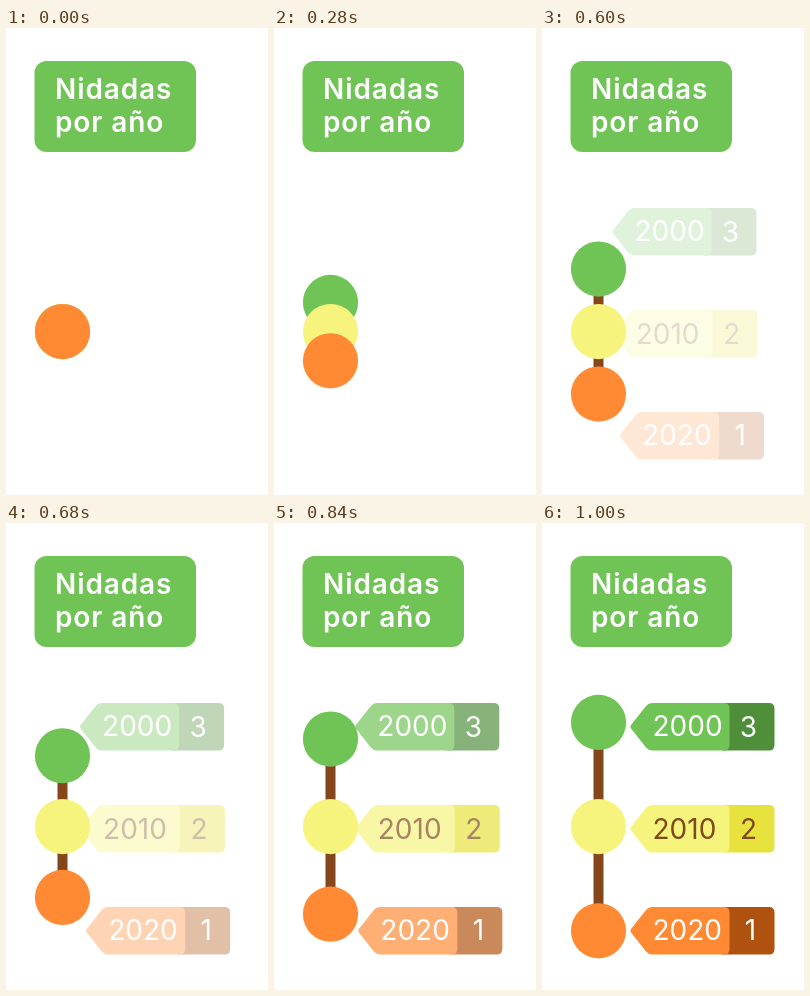
Write an HTML page that moves like this. It is 262 px wide and 467 px high and loops after 3 s.

```html
<!DOCTYPE html>
<html lang="es">
<head>
<meta charset="utf-8">
<title>Nidadas por año</title>
<style>
  html, body { margin: 0; width: 100%; height: 100%; overflow: hidden; background: #fff; }
  svg { display: block; width: 100vw; height: 100vh; }
  text { font: 28px Inter, "Open Sans", sans-serif; }
  .title { font-weight: 600; letter-spacing: 0.9px; fill: #fff; }
  .count { text-anchor: middle; }
</style>
</head>
<body>
<svg viewBox="0 0 262 467">
  <rect x="28.5" y="33" width="161.5" height="91" rx="12" fill="#70c355"/>
  <text class="title" x="49" y="70.5">Nidadas</text>
  <text class="title" x="49" y="103.5">por año</text>
  <rect id="rod" x="51.5" width="10" fill="#84461a"/>
  <g id="labels"></g>
  <g id="dots"></g>
</svg>
<script>
const LOOP = 3000, MOVE_END = 1000, LABEL_START = 500, STEP = 40;
const CENTER = 303.6, SPREAD = 104.2;

const rows = [
  { year: "2000", count: "3", color: "#70c355", dark: "#4f8f3a", ink: "#fff", top: 180, baseline: 213, countX: 206.5, slide: 22.5, side: -1 },
  { year: "2010", count: "2", color: "#f6f47c", dark: "#e8e23e", ink: "#7d4a1c", top: 282, baseline: 315.5, countX: 206.5, slide: 21, side: 0 },
  { year: "2020", count: "1", color: "#ff8a33", dark: "#b0520f", ink: "#fff", top: 384, baseline: 416.5, countX: 208.5, slide: 13, side: 1 },
];

function add(parent, tag, attrs, text = "") {
  const node = document.createElementNS("http://www.w3.org/2000/svg", tag);
  for (const key in attrs) node.setAttribute(key, attrs[key]);
  node.textContent = text;
  return parent.appendChild(node);
}

const rod = document.getElementById("rod");
const labels = document.getElementById("labels");
const dots = document.getElementById("dots");

// Arrow-shaped tag pointing left, with rounded corners
const arrow = "M89 22 L104 3 Q106.500 0 110 0 H182 Q187.500 0 187.500 5.500 V42 " +
  "Q187.500 47.500 182 47.500 H110 Q106.500 47.500 104 44.500 L89 25.500 Q87.500 23.750 89 22 Z";

for (const row of rows) {
  row.label = add(labels, "g", {});
  const tag = add(row.label, "g", { transform: `translate(0 ${row.top})` });
  add(tag, "path", { d: "M180 0 H227 Q232.500 0 232.500 5.500 V42 Q232.500 47.500 227 47.500 H180 Z", fill: row.dark });
  add(tag, "path", { d: arrow, fill: row.color });
  add(row.label, "text", { x: 110.5, y: row.baseline, fill: row.ink }, row.year);
  add(row.label, "text", { class: "count", x: row.countX, y: row.baseline + 0.5, fill: row.ink }, row.count);
  row.dot = add(dots, "circle", { cx: 56.5, r: 27.6, fill: row.color });
}

function draw(now) {
  const time = Math.floor((now % LOOP) / STEP) * STEP;
  const spread = SPREAD * Math.min(1, time / MOVE_END);
  const shown = Math.max(0, Math.min(1, (time - LABEL_START) / (MOVE_END - LABEL_START)));

  rod.setAttribute("y", CENTER - spread);
  rod.setAttribute("height", 2 * spread);
  for (const row of rows) {
    row.dot.setAttribute("cy", CENTER + row.side * spread);
    row.label.setAttribute("opacity", shown);
    row.label.setAttribute("transform", `translate(${-row.slide * (1 - shown)} 0)`);
  }
}

const start = performance.now();
function tick() {
  draw(performance.now() - start);
  requestAnimationFrame(tick);
}
tick();
</script>
</body>
</html>
```
